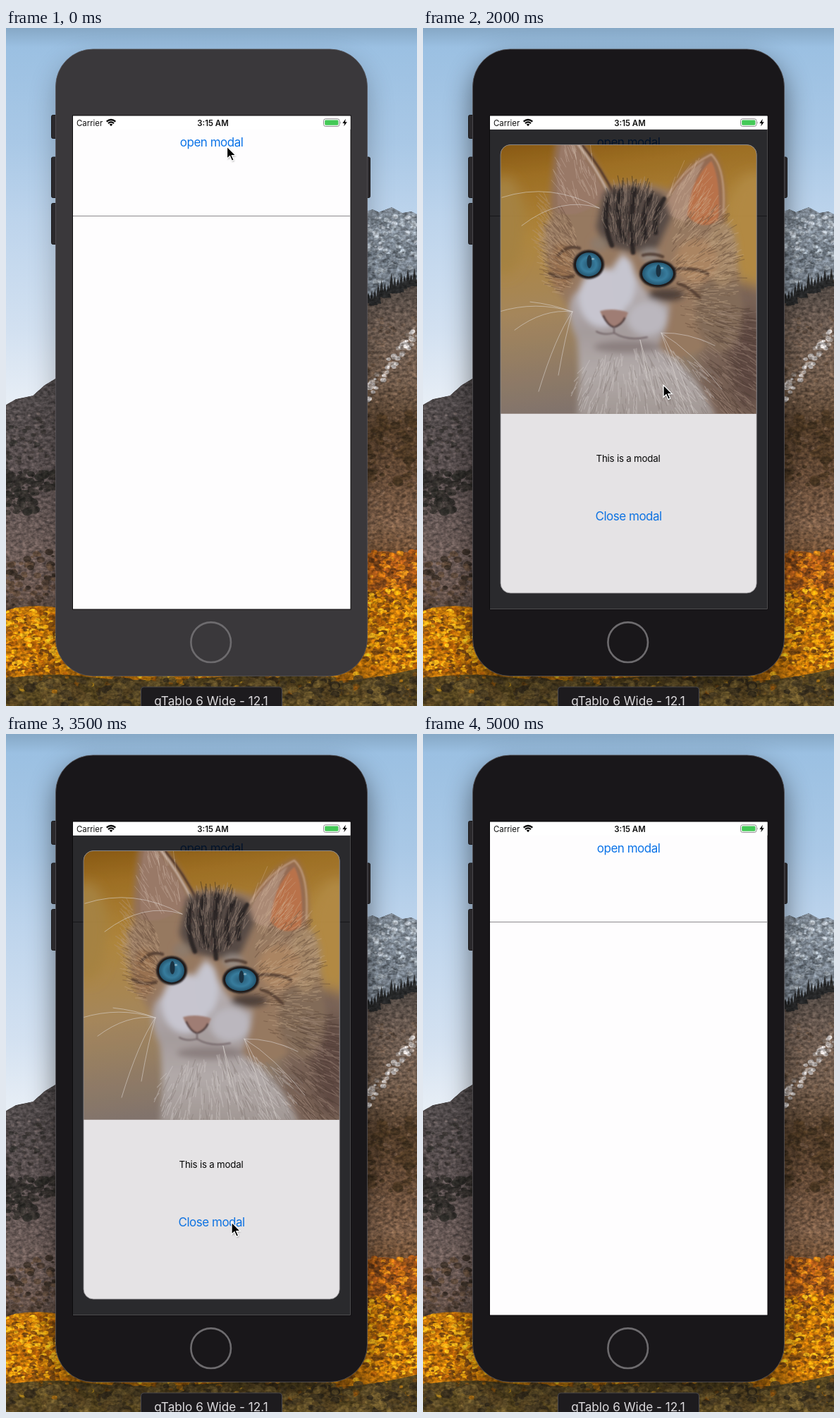
An HTML page for the animation above (5100 ms loop, 583 by 961 pixels).

```html
<!DOCTYPE html>
<html lang="en">
<head>
<meta charset="utf-8">
<title>Modal demo</title>
<style>
  html, body { margin: 0; width: 100%; height: 100%; overflow: hidden; background: #b4cfea; }
  svg { display: block; width: 583px; height: 961px; }
  text { font-family: Inter, "Liberation Sans", sans-serif; text-anchor: middle; }
  .button { font-size: 17px; letter-spacing: -.48px; fill: #0c74e8; }
</style>
</head>
<body>
<svg viewBox="0 0 583 961" xmlns="http://www.w3.org/2000/svg">
  <defs>
    <linearGradient id="sky" x2="0" y2="1">
      <stop offset="0" stop-color="#86a8c6"/><stop offset=".05" stop-color="#9bc0e2"/>
      <stop offset=".3" stop-color="#a9c8e6"/><stop offset=".5" stop-color="#bdd4ec"/>
      <stop offset=".8" stop-color="#d3e1f1"/><stop offset="1" stop-color="#e9eff6"/>
    </linearGradient>
    <linearGradient id="leftHill" x2="0" y2="1">
      <stop offset="0" stop-color="#4d4849"/><stop offset=".3" stop-color="#5a5050"/>
      <stop offset=".55" stop-color="#6f5e59"/><stop offset=".66" stop-color="#69564e"/>
      <stop offset=".75" stop-color="#463a31"/>
    </linearGradient>
    <linearGradient id="rightHill" x2="0" y2="1">
      <stop offset="0" stop-color="#4a433f"/><stop offset=".15" stop-color="#6b5b51"/>
      <stop offset=".35" stop-color="#705b4b"/><stop offset=".5" stop-color="#513c29"/>
      <stop offset=".66" stop-color="#654b37"/><stop offset=".82" stop-color="#7d5f49"/>
      <stop offset="1" stop-color="#6a4524"/>
    </linearGradient>
    <linearGradient id="wall" x2=".12" y2="1">
      <stop offset=".08" stop-color="#915b0c"/><stop offset=".2" stop-color="#ad7822"/>
      <stop offset=".38" stop-color="#c2933f"/><stop offset=".6" stop-color="#b69362"/>
      <stop offset=".9" stop-color="#8e7e75"/>
    </linearGradient>
    <linearGradient id="chest" x2="0" y2="1">
      <stop offset="0" stop-color="#d6d0d5"/><stop offset=".4" stop-color="#b6abab"/>
      <stop offset=".6" stop-color="#c5bcba"/><stop offset="1" stop-color="#a2958f"/>
    </linearGradient>
    <radialGradient id="iris">
      <stop offset="0" stop-color="#28607e"/><stop offset=".6" stop-color="#3a88ad"/>
      <stop offset="1" stop-color="#245c79"/>
    </radialGradient>
    <filter id="soft1" x="-30%" y="-30%" width="160%" height="160%"><feGaussianBlur stdDeviation="1.2"/></filter>
    <filter id="soft4" x="-30%" y="-30%" width="160%" height="160%"><feGaussianBlur stdDeviation="4"/></filter>
    <filter id="soft9" x="-30%" y="-30%" width="160%" height="160%"><feGaussianBlur stdDeviation="9"/></filter>
    <filter id="glow" x="-20%" y="-20%" width="140%" height="140%"><feGaussianBlur stdDeviation="19"/></filter>
    <filter id="grain" x="0" y="0" width="1" height="1" color-interpolation-filters="sRGB">
      <feTurbulence type="fractalNoise" baseFrequency=".17 .24" numOctaves="3" seed="4"/>
      <feColorMatrix values="1 0 0 0 0  1 0 0 0 0  1 0 0 0 0  0 0 0 0 1" result="noise"/>
      <feGaussianBlur in="SourceGraphic" stdDeviation=".7"/>
      <feComposite in2="noise" operator="arithmetic" k1="1" k2=".5"/>
      <feComposite in2="SourceAlpha" operator="in"/>
    </filter>
    <clipPath id="card"><rect id="cardClip" rx="14"/></clipPath>
    <clipPath id="photo"><rect id="photoClip"/></clipPath>
  </defs>

  <rect width="583" height="540" fill="url(#sky)"/>
  <g id="land" filter="url(#grain)"></g>

  <rect id="shadow" x="70" y="46" width="443" height="886" rx="52" filter="url(#glow)"/>
  <g fill="#2b292c" stroke="#19181a">
    <rect x="64.5" y="123.5" width="10" height="33" rx="2"/>
    <rect x="64.5" y="183" width="10" height="57.5" rx="2"/>
    <rect x="64.5" y="248.5" width="10" height="58" rx="2"/>
    <rect x="507" y="183" width="9.5" height="57.5" rx="2"/>
  </g>
  <rect id="body" x="70.5" y="30" width="442" height="888.5" rx="53" stroke="#565457" stroke-width=".8"/>
  <circle cx="290.7" cy="870.7" r="28.3" fill="none" stroke="#6d6b6e" stroke-width="2.6"/>

  <rect x="94.5" y="124" width="394.5" height="700" fill="#fefdfe" stroke="#0c0b0d"/>
  <text x="291.6" y="167.5" class="button">open modal</text>
  <path d="M95 266.5H488.5" stroke="#8c8a8d"/>
  <rect id="dim" x="95" y="143.5" width="393.5" height="680" fill="#010004"/>

  <g id="modal">
    <g clip-path="url(#card)">
      <rect x="95" y="125" width="394" height="700" fill="#fffdff"/>
      <g clip-path="url(#photo)"><g id="cat"></g></g>
    </g>
    <rect id="edge" rx="14" fill="none" stroke="#9b999c" stroke-width=".8"/>
    <text id="note" x="291" font-size="13.3" letter-spacing="-.21" fill="#000">This is a modal</text>
    <text id="close" x="291.6" class="button" style="fill:#0b7dfb">Close modal</text>
  </g>

  <rect x="95" y="125" width="393.5" height="18.7" fill="#fff"/>
  <text x="118.6" y="138.5" font-size="11.4" fill="#111">Carrier</text>
  <path d="M142.7 132.6Q149 127.4 155.3 132.6M145 135.1Q149 131.8 153 135.1" fill="none" stroke="#000" stroke-width="2.2"/>
  <path d="M146.7 136.6Q149 135 151.3 136.6L149 139.2Z"/>
  <text x="293.5" y="138.5" font-size="11.4" font-weight="600" fill="#111">3:15 AM</text>
  <rect x="450.5" y="128.8" width="22.5" height="10.6" rx="2.8" fill="none" stroke="#8d8b8e"/>
  <rect x="452.2" y="130.5" width="19.2" height="7.2" rx="1.4" fill="#43c956"/>
  <path d="M474.2 132.2q1.7 2 0 4z" fill="#8d8b8e"/>
  <path d="M481.8 128.8L477.4 134.9H480.2L479.3 139.3L483.8 133.2H481Z"/>

  <rect x="191.5" y="934" width="200" height="40" rx="4" fill="#1d1b1e" stroke="#4a484b"/>
  <text x="291" y="960" font-size="17.2" fill="#dddbde">qTablo 6 Wide - 12.1</text>

  <g id="cursor">
    <path d="M0 0V17.3L4 13.7L6.9 20.3L9.7 19.1L6.9 12.6H12.4Z" transform="translate(.8 1.5)" opacity=".35" filter="url(#soft1)"/>
    <path d="M0 0V17.3L4 13.7L6.9 20.3L9.7 19.1L6.9 12.6H12.4Z" stroke="#fff" stroke-width="1.3"/>
  </g>
</svg>
<script>
const LOOP = 5100, STEP = 100;
const $ = id => document.getElementById(id);
const set = (id, attrs) => { for (const k in attrs) $(id).setAttribute(k, attrs[k]); };
const clamp = v => Math.max(0, Math.min(1, v));
const mix = (a, b, p) => a + (b - a) * p;
const ease = p => p * p * (3 - 2 * p);

let seed = 41;
const rnd = () => {
  seed = (seed * 1664525 + 1013904223) % 4294967296;
  return seed / 4294967296;
};
const path = (d, fill, extra = '') => `<path d="${d}" fill="${fill}" ${extra}/>`;
const lines = (d, color, width, extra = '') =>
  path(d, 'none', `stroke="${color}" stroke-width="${width}" stroke-linecap="round" ${extra}`);
const oval = (x, y, rx, ry, fill, extra = '') =>
  `<ellipse cx="${x}" cy="${y}" rx="${rx}" ry="${ry}" fill="${fill}" ${extra}/>`;
const soft = (n, body) => `<g filter="url(#soft${n})">${body}</g>`;

// random clumps inside a box, far ones first; slope tilts the box
function clumps(n, x, y, w, h, size, colors, alpha = 1, slope = 0) {
  let out = '';
  for (let i = 0; i < n; i++) {
    const r = size * (.5 + rnd()), dx = rnd() * w;
    const c = colors[Math.floor(rnd() * colors.length)];
    out += oval((x + dx).toFixed(1), (y + dx * slope + h * (i + rnd()) / n).toFixed(1),
      r.toFixed(1), (r * .75).toFixed(1), c, `opacity="${alpha}"`);
  }
  return out;
}

function pines(n, x, y, w, rise) {
  let d = '';
  for (let i = 0; i < n; i++) {
    const px = x + w * i / n, py = y - rise * i / n + rnd() * 8, h = 14 + rnd() * 16;
    d += `M${px - 4} ${py}L${px} ${py - h}L${px + 4} ${py}Z`;
  }
  return path(d, '#272829');
}

function landscape() {
  const rock = ['#3d3839', '#80716d', '#4d4546', '#72655f'];
  const scrub = ['#3d2d20', '#8c6f58', '#634b35', '#8a6f5a'];
  const dark = ['#302d2a', '#2a2926', '#3b3632'];
  const leaf = ['#e9a00e', '#d07c0a', '#f4b41c', '#b0600a', '#de8b0c', '#8f5410', '#7d4a12'];
  const rust = ['#b8601a', '#cf7414', '#8c4c1a', '#d98a1a', '#713f18'];
  const bush = ['#4a3d24', '#62502a', '#352c1d', '#715c2e', '#584522'];
  return path('M0 534L14 526L38 521L55 506L75 494V961H0Z', 'url(#leftHill)') +
    clumps(220, 0, 540, 74, 270, 2, rock, .4) +
    clumps(45, 0, 560, 74, 60, 3, dark, .6, -.2) +
    clumps(75, 0, 628, 74, 28, 4.5, dark, .85) +
    clumps(45, 0, 655, 42, 32, 5, dark, .85) +
    clumps(70, 0, 755, 75, 70, 4, ['#352a22', '#4b3b2f', '#5f4a3a'], .8, -.25) +
    path('M505 262L520 257L529 261L547 254L562 262L575 260L583 264V420H505Z', '#7d8792') +
    clumps(130, 511, 266, 72, 55, 3, ['#c9d0d8', '#9aa4ae', '#6a747e', '#b4bdc6'], .7) +
    clumps(90, 511, 315, 72, 50, 3, ['#5b646e', '#8f99a3', '#4d555e', '#a8b0b8'], .6) +
    path('M505 390L530 380L556 370L583 356V780H505Z', 'url(#rightHill)') +
    pines(15, 514, 390, 70, 34) +
    clumps(240, 511, 410, 72, 335, 2.4, scrub, .4) +
    clumps(75, 513, 506, 70, 22, 3, ['#c9c6c5', '#a89f9a', '#dcdad9', '#8c7d73'], .75, -1.25) +
    clumps(50, 511, 545, 72, 105, 6, ['#3b2c1b', '#4c3822'], .65) +
    path('M505 748Q530 738 550 744T583 738V961H505Z', '#9c5416') +
    path('M0 826Q30 815 75 822V880H505V800L583 790V961H0Z', '#b8700c') +
    clumps(190, 508, 742, 75, 70, 4, rust) +
    clumps(380, -2, 823, 78, 92, 3.6, leaf) +
    clumps(430, 508, 796, 78, 112, 3.6, leaf) +
    clumps(100, 75, 895, 430, 28, 5, leaf) +
    path('M0 922Q60 912 120 920T300 920T450 922T583 908V961H0Z', '#54441f') +
    clumps(110, 0, 916, 583, 30, 4, leaf, .5) +
    clumps(280, 0, 922, 583, 40, 6, bush, .8) +
    [82, 168, 452, 530].map(x => clumps(26, x - 28, 924, 56, 36, 7, bush, .9)).join('');
}

const whiskers = (x, y, ends) => lines(ends.map(([ex, ey, bend]) =>
  `M${x} ${y}Q${(x + ex) / 2} ${(y + ey) / 2 + bend} ${ex} ${ey}`).join(''),
  '#f3ece8', .9, 'opacity=".65"');

// hairs in an oval, combed away from the nose
function fur(n, cx, cy, rx, ry, len, color, width = 1.2) {
  let d = '';
  for (let i = 0; i < n; i++) {
    const a = rnd() * 2 * Math.PI, q = Math.sqrt(rnd());
    const x = cx + rx * q * Math.cos(a), y = cy + ry * q * Math.sin(a);
    const way = Math.atan2(y - 385, x - 285) + (rnd() - .5) * .5, l = len * (.5 + rnd());
    d += `M${x.toFixed(1)} ${y.toFixed(1)}l${(l * Math.cos(way)).toFixed(1)} ${(l * Math.sin(way)).toFixed(1)}`;
  }
  return lines(d, color, width, 'opacity=".4"');
}

const eye = (x, y, rx, ry) =>
  soft(1, oval(x, y, rx + 4, ry + 3.5, '#1c1718')) +
  oval(x, y, rx, ry, 'url(#iris)') +
  oval(x + 1, y - 4, 3.5, ry * .55, '#173344') +
  oval(x + 6, y - 8, 2, 1.5, '#8fbdd2');

function catPhoto() {
  return '<rect x="80" y="120" width="424" height="480" fill="url(#wall)"/>' +
    soft(9, oval(470, 285, 40, 80, '#c59746') + oval(115, 280, 30, 70, '#b78f45') +
      path('M405 385Q465 330 500 400V610H370Z', '#846a5c') + oval(462, 470, 28, 70, '#685046')) +
    soft(4, path('M182 285Q176 235 192 140L216 148Q250 190 274 250Z', '#a17b62') +
      path('M330 272Q356 198 410 176Q434 205 428 295Z', '#a3755a') +
      path('M172 282Q200 228 270 221Q330 212 380 245Q438 270 446 330Q456 400 420 440Q370 480 300 468Q230 440 196 380Q168 320 172 282Z', '#a68468') +
      oval(420, 400, 34, 60, '#8f745f') + oval(425, 320, 22, 46, '#b6946f')) +
    soft(1, path('M192 262Q186 200 200 150Q236 190 260 237Q225 272 192 262Z', '#a9846f') +
      path('M372 262Q382 212 409 188Q423 215 419 272Q394 290 372 262Z', '#cd7d50') +
      path('M340 262Q362 210 400 187Q378 225 374 275Z', '#bd9880') +
      lines('M216 160Q244 194 266 240', '#dcc4b4', 3) +
      lines('M338 256Q362 202 409 179Q430 198 426 262', '#d9b296', 2) +
      lines('M226 166Q254 200 271 236', '#57392a', 3)) +
    soft(4, path('M256 232Q294 218 340 236L352 268L332 312L300 318L258 308L246 282Z', '#5d504a') +
      oval(196, 338, 16, 34, '#a97d57') + oval(388, 330, 30, 32, '#bd926b') +
      oval(250, 306, 12, 10, '#9b8775') + oval(322, 322, 14, 10, '#a4978f') +
      path('M212 380Q236 352 258 352L284 318L305 355Q322 388 350 392Q348 430 332 452Q404 490 432 600H214Q226 500 218 440Q200 405 212 380Z', 'url(#chest)') +
      oval(255, 382, 34, 42, '#dddbe6') + oval(286, 360, 15, 36, '#dcdbe6') + oval(318, 412, 28, 24, '#cfcbd2') +
      oval(345, 378, 26, 9, '#55443c') + oval(290, 452, 48, 9, '#9a8c8b')) +
    soft(1, lines('M262 242Q254 275 268 308M281 230Q270 268 286 300M300 228Q292 272 298 318M322 238Q308 268 316 298M342 242Q326 266 330 290',
      '#27211f', 6.5, 'opacity=".85"') +
      lines('M192 322Q205 306 222 312M354 342Q382 338 404 348M180 348Q194 356 212 352M362 362Q380 368 392 382M312 322Q325 318 340 324', '#503a2c', 4.5, 'opacity=".8"')) +
    fur(260, 395, 330, 46, 90, 11, '#dfbd9a') + fur(200, 398, 345, 48, 90, 10, '#614733') +
    fur(130, 196, 320, 24, 60, 10, '#d9b692') + fur(110, 196, 320, 24, 60, 10, '#664a36') +
    fur(150, 296, 265, 42, 45, 12, '#bda692') + fur(170, 296, 265, 38, 45, 12, '#1f1b1b') +
    fur(170, 440, 470, 40, 80, 16, '#4c382f') + fur(130, 430, 470, 45, 80, 16, '#b69c8a') +
    fur(200, 310, 505, 95, 55, 16, '#ebe4e2') + fur(120, 320, 505, 95, 55, 16, '#8d7f7a') +
    fur(60, 222, 212, 32, 45, 18, '#ecd6c2', .9) + fur(70, 375, 245, 28, 45, 18, '#ecc9ab', .9) +
    fur(60, 175, 285, 10, 45, 12, '#c8a583') +
    eye(235, 335, 18, 17) + eye(333, 348, 22, 16) +
    soft(1, path('M251 401Q270 396 291 403Q286 419 271 425Q256 416 251 401Z', '#b0897e') +
      lines('M256 408Q262 421 271 424Q282 420 286 411', '#4c3635', 2.5) +
      lines('M271 424V432Q256 436 246 430M271 432Q290 444 318 438', '#7d6d70', 2)) +
    whiskers(212, 402, [[108, 402, -16], [130, 428, -18], [152, 388, -4], [164, 515, -22], [192, 492, -12]]) +
    whiskers(338, 432, [[424, 512, -14], [384, 545, -18], [372, 542, -8], [414, 450, -10]]) +
    whiskers(308, 442, [[328, 520, -4], [318, 496, 0]]) +
    whiskers(250, 255, [[112, 240, -30], [140, 280, -30]]);
}

$('land').innerHTML = landscape();
$('cat').innerHTML = catPhoto();

// underdamped spring from 0 to 1, first peak after 300 ms
function spring(ms) {
  const s = Math.max(0, ms) / 1000, decay = 6.7, w = Math.PI / .3;
  return 1 - Math.exp(-decay * s) * (Math.cos(w * s) + decay / w * Math.sin(w * s));
}

function layout(inset) {
  const x = 95 + inset, y = 150.5 + inset, width = 393.2 - 2 * inset, height = 665.5 - 2 * inset;
  const photo = height * .6, rest = height - photo, low = y + photo;
  const box = { x, y, width, height };
  set('cardClip', box);
  set('edge', box);
  set('photoClip', { x, y, width, height: photo });
  set('cat', { transform: `translate(291.6 ${y + photo / 2}) scale(${width / 363.2}) translate(-291.6 -356)` });
  set('note', { y: low + rest * .25 + 4.7 });
  set('close', { y: low + rest * .574 + 5.5 });
}

// time, x, y
const moves = [
  [0, 313.5, 168], [100, 313.5, 167], [1400, 313.5, 167], [2000, 341, 506],
  [2600, 320, 692], [4300, 320, 692], [4800, 600, 850], [LOOP, 600, 850]
];
function pointer(t) {
  const i = moves.findIndex(m => m[0] > t), [t0, x0, y0] = moves[i - 1], [t1, x1, y1] = moves[i];
  const p = ease((t - t0) / (t1 - t0));
  return `translate(${mix(x0, x1, p)} ${mix(y0, y1, p)})`;
}

const OPEN = 200, CLOSE = 3600;
function draw(t) {
  const active = t >= 100;
  const leave = clamp((t - CLOSE) / 300);
  const fade = clamp((t - OPEN) / 200) * (1 - leave);
  const grow = t < CLOSE ? spring(t - OPEN) : 1 - leave;
  layout(mix(52, 15, grow));
  set('modal', { opacity: .88 * fade, visibility: fade ? 'visible' : 'hidden' });
  set('dim', { opacity: .835 * Math.pow(fade, .83) });
  set('body', { fill: active ? '#19171a' : '#3a383b' });
  set('shadow', { opacity: active ? .5 : .25 });
  set('cursor', { transform: pointer(t) });
}

const start = performance.now();
function tick() {
  const t = (performance.now() - start) % LOOP;
  draw(Math.floor(t / STEP) * STEP);
  requestAnimationFrame(tick);
}
tick();
</script>
</body>
</html>
```
